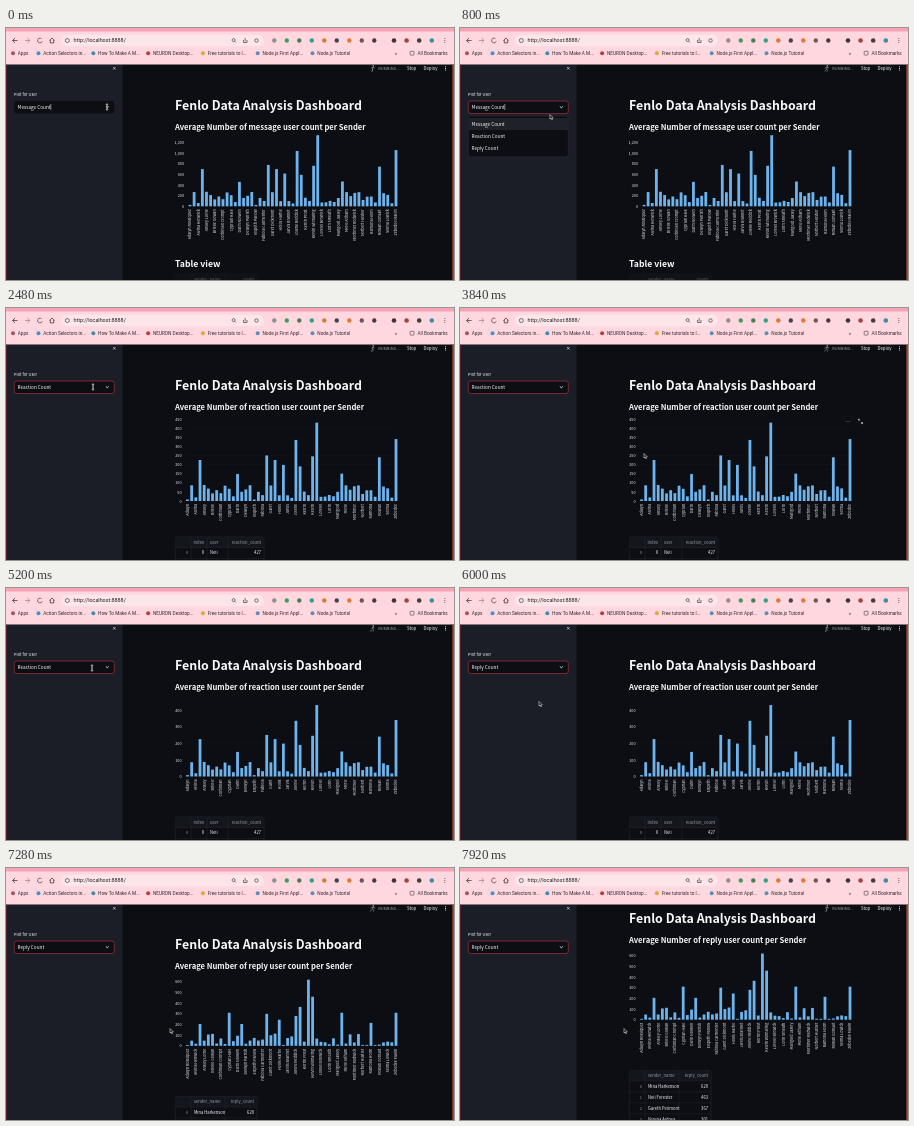
An HTML page with a canvas for the animation above (8000 ms loop, 448 px wide and 252 px high).

```html
<!DOCTYPE html>
<html lang="en">
<head>
<meta charset="utf-8">
<title>Dashboard</title>
<style>
html, body { margin: 0; width: 100%; height: 100%; overflow: hidden; background: #0c0e14; }
canvas { display: block; width: 448px; height: 252px; }
</style>
</head>
<body>
<canvas id="stage"></canvas>
<script>
const W = 448, H = 252, LOOP = 8000, BARS = 51;
const canvas = document.getElementById('stage');
const dpr = window.devicePixelRatio || 1;
canvas.width = W * dpr;
canvas.height = H * dpr;
const c = canvas.getContext('2d');

const SANS = '"Noto Sans CJK JP", "Noto Sans CJK SC", "Noto Sans", sans-serif';
const UI = 'Roboto, Inter, sans-serif';
const WHITE = '#fafafa', RED = '#b93a40', PANEL = '#1b1d27', PAGE = '#0c0e14', INK = '#4a3a40';

function random(seed) {
  return () => (seed = (seed * 16807) % 2147483647) / 2147483647;
}
// low, skewed noise with a few tall bars
function series(seed, spread, peaks) {
  const r = random(seed);
  return Array.from({ length: BARS }, (_, i) => {
    const noise = 8 + spread * r() ** 1.5;
    return peaks[i] || noise;
  });
}
const reaction = series(4242, 80, { 3: 225, 12: 148, 19: 250, 21: 225, 23: 198, 26: 335, 27: 190, 30: 245, 31: 430, 37: 150, 46: 240, 50: 340 });
const reply = series(977, 110, { 3: 205, 10: 310, 13: 205, 19: 300, 22: 245, 26: 280, 27: 365, 29: 620, 30: 460, 37: 310, 44: 215, 50: 310 });
const message = reaction.map(v => v * 3.1);

const people = ('Adalyn Rossiquez,Alvina Henwick,Ansley Lorne,Brielle Gowan,Corbinian Crompt,Cyprian Hale,' +
  'Darin Nolwen,Delwyn Parrish,Elspeth Parlow,Fabiola Carmenter,Garet Dickmont,Hollis Hartle,Jarvis Brannet,' +
  'Jolene Reddick,Kerrin Prost,Kelvin Wilmaring,Lorelei Browick,Lorin Smeath,Marigold Jaxley,Merle Altham,' +
  'Mortimer Rodwick,Norbert Hustler,Ramona Holm,Rowan Gonsalt,Selma Lowick,Zebedee Mallin').split(',');
const firstNames = people.map(p => p.split(' ')[0]);

const charts = {
  message: { data: message, base: 178.3, unit: 64 / 1200, step: 200, top: 1200, x0: 184, names: people },
  reaction: { data: reaction, base: 193, unit: 82 / 450, step: 50, top: 450, x0: 181.5, names: firstNames },
  compact: { data: reaction, base: 188.5, unit: 66.5 / 400, step: 100, top: 400, x0: 181.5, names: firstNames },
  reply: { data: reply, base: 178.3, unit: 64 / 600, step: 100, top: 600, x0: 181.5, names: people }
};
const options = ['Message Count', 'Reaction Count', 'Reply Count'];

// pointer moves: start, end, x, y
const moves = [
  [480, 1200, 77, 103], [1680, 2320, 87, 79], [2480, 3520, 185, 148],
  [4240, 5040, 86, 80], [5440, 5920, 80, 116], [6240, 6640, 142, 168], [6800, 7200, 165, 163]
];

const ease = p => p * p * (3 - 2 * p);
const span = (t, a, b) => ease(Math.min(1, Math.max(0, (t - a) / (b - a))));

function pointerAt(t) {
  let x = 101, y = 79;
  for (const [a, b, tx, ty] of moves) {
    const p = span(t, a, b);
    x += (tx - x) * p;
    y += (ty - y) * p;
  }
  return [x, y];
}

function text(s, x, y, size, color = WHITE, { weight = 400, align = 'left', font = SANS } = {}) {
  c.font = `${weight} ${size}px ${font}`;
  c.textAlign = align;
  c.fillStyle = color;
  c.fillText(s, x, y + size * 0.36);
}
function rect(x, y, w, h, color) {
  c.fillStyle = color;
  c.fillRect(x, y, w, h);
}
function round(x, y, w, h, r, fill, stroke, lw = 0.6) {
  c.beginPath();
  c.roundRect(x, y, w, h, r);
  if (fill) { c.fillStyle = fill; c.fill(); }
  if (stroke) { c.strokeStyle = stroke; c.lineWidth = lw; c.stroke(); }
}
function dot(x, y, r, color) {
  c.beginPath();
  c.arc(x, y, r, 0, 7);
  c.fillStyle = color;
  c.fill();
}
function ring(x, y, r, from = 0, to = 7) {
  c.beginPath();
  c.arc(x, y, r, from, to);
  c.strokeStyle = INK;
  c.lineWidth = 0.7;
  c.stroke();
}
// polylines given as flat coordinate lists
function line(color, lw, ...polys) {
  c.strokeStyle = color;
  c.lineWidth = lw;
  c.beginPath();
  for (const p of polys)
    for (let i = 0; i < p.length; i += 2) i ? c.lineTo(p[i], p[i + 1]) : c.moveTo(p[i], p[i + 1]);
  c.stroke();
}

function browser() {
  rect(0, 0, W, 36.5, '#ffd7de');
  rect(0, 0, W, 3.5, '#f7a3b4');
  const y = 12.5;
  line(INK, 0.8, [11.5, y, 6.5, y], [9, y - 2.4, 6.5, y, 9, y + 2.4]);
  line('#a58b92', 0.8, [19, y, 24, y], [21.5, y - 2.4, 24, y, 21.5, y + 2.4]);
  ring(34, y, 2.4, 0.3, 5.4);
  line(INK, 0.8, [43.4, y, 46, y - 2.5, 48.6, y], [44.3, y - 0.6, 44.3, y + 2.4, 47.7, y + 2.4, 47.7, y - 0.6]);
  round(55, 6.7, 203, 11.6, 5.8, '#fbe6ea');
  ring(61.3, y, 2);
  text('http://localhost:8888/', 67.5, y, 5.4, '#2a2024', { font: UI });
  ring(227.6, y - 0.4, 1.5);
  line(INK, 0.7, [228.8, y + 0.8, 230, y + 2], [237.5, y - 0.5, 237.5, y + 2, 241, y + 2, 241, y - 0.5], [239.2, y + 0.8, 239.2, y - 2.6]);
  ring(250.5, y, 1.7);
  ['#8d8f94', '#3f9f58', '#4f7a58', '#32a08c', '#d9792c', '#43444a', '#dd7a32', '#6e5a52', '#4a3a40']
    .forEach((col, i) => dot(268.3 + i * 12.5, y, 2.2, col));
  ['#3d3438', '#a1453c', '#4a3a40', '#3c8fa3'].forEach((col, i) => dot(388 + i * 12.6, y, 2.3, col));
  for (const dy of [-1.9, 0, 1.9]) dot(438.8, y + dy, 0.5, INK);

  const mark = (label, x, col) => {
    dot(x, 25.2, 2, col);
    text(label, x + 4.8, 25.2, 4.7, '#33282c', { font: UI });
  };
  mark('Apps', 7, '#a8555a');
  [['Action Selectors in...', '#4a8fd0'], ['How To Make A M...', '#3f8fb0'], ['NEURON Desktop...', '#c03a3a'],
    ['Free tutorials to l...', '#e0a92c'], ['Node.js First Appl...', '#5b8fb8'], ['Node.js Tutorial', '#5b8fb8']]
    .forEach(([label, col], i) => mark(label, 32.5 + i * 54.8, col));
  text('»', 388.5, 25, 5.5, INK, { font: UI });
  round(404.2, 23.3, 3.8, 3.8, 0.5, null, INK);
  text('All Bookmarks', 411.5, 25.2, 4.7, '#33282c', { font: UI });
}

function runner(t) {
  const s = Math.sin(t / 60) * 1.4, col = '#9a9ca3';
  dot(367.3, 37.9, 0.8, col);
  line(col, 0.6, [367, 38.8, 366.6, 41], [365 - s * 0.4, 40.2, 367, 39.3, 368.8 + s * 0.4, 40.1],
    [366.6, 41, 366.6 + s, 42.3, 366 + s, 43.7], [366.6, 41, 366.6 - s, 42.3, 365.6 - s, 43.5]);
}

function header(t) {
  runner(t);
  text('RUNNING...', 372.3, 40.4, 4, '#a3a5ac');
  text('Stop', 401, 40.4, 4.3);
  text('Deploy', 417.5, 40.4, 4.3);
  for (const dy of [-1.7, 0, 1.7]) dot(439.5, 40.4 + dy, 0.5, WHITE);
}

function select(value, focused) {
  text('Plot for User', 8, 67, 4);
  round(8.3, 73, 100, 12.6, 2.4, PAGE, focused && RED);
  text(value, 11.6, 79, 4.7);
  line(WHITE, 0.8, [99.8, 78.4, 101.3, 79.8, 102.8, 78.4]);
}

function menu(hot) {
  round(8.3, 88, 100, 41, 2.4, PAGE, '#31333f', 0.5);
  options.forEach((o, i) => {
    const y = 96 + i * 12;
    if (i === hot) rect(9, y - 6, 99, 12, '#1f2129');
    text(o, 11.6, y, 4.7);
  });
}

function chart({ data, base, unit, step, top, x0, names }) {
  const pitch = (390 - x0) / (BARS - 1);
  for (let v = 0; v <= top; v += step) {
    const y = base - v * unit;
    line('#141720', 0.4, [x0 - 2.5, y, 392.5, y]);
    text(v.toLocaleString('en-US'), x0 - 6, y + 0.3, 3.8, '#e6e8ee', { align: 'right' });
  }
  data.forEach((v, i) => {
    const x = x0 + i * pitch;
    rect(x - 1.4, base - v * unit, 2.8, v * unit, '#6db3ec');
    if (i % 2) return;
    c.save();
    c.translate(x, base + 3);
    c.rotate(-Math.PI / 2);
    text(names[i / 2], 0, 0, 3.7, '#e6e8ee', { align: 'right' });
    c.restore();
  });
}

// cols: title, left, right, right-aligned
function table(cols, rows, y, right) {
  const pitch = 11, h = rows.length * pitch + 10.5;
  round(169.3, y, right - 169.3, h, 2, PAGE, '#2a2d36', 0.5);
  rect(169.6, y + 0.3, right - 170, 10, '#14161d');
  const put = (s, [, l, r, end], cy, col) =>
    text(s, end ? r - 3 : l + 3, cy, 4.15, col, { align: end ? 'right' : 'left' });
  for (const col of cols) {
    put(col[0], col, y + 5.2, '#999ca4');
    line('#2a2d36', 0.4, [col[1], y, col[1], y + h]);
  }
  rows.forEach((row, i) => {
    const cy = y + 16 + i * pitch;
    line('#2a2d36', 0.4, [169.3, cy - 5.5, right, cy - 5.5]);
    text(i, 182, cy, 4, '#8d9098', { align: 'right' });
    row.forEach((s, k) => put(s, cols[k], cy, WHITE));
  });
}

const reactionTable = () => table(
  [['index', 185, 201, true], ['user', 201, 222], ['reaction_count', 222, 258, true]],
  [['0', 'Nell', '427'], ['1', 'Mina', '398']], 229, 258);
const replyTable = () => table(
  [['sender_name', 185, 219], ['reply_count', 219, 251, true]],
  [['Mina Harkenson', '620'], ['Nell Forester', '463'], ['Gareth Pellmont', '367'],
   ['Verena Aldous', '301'], ['Orla Winthorne', '298']], 229, 251);

function cursor(t) {
  const [x, y] = pointerAt(t);
  c.save();
  c.translate(x, y);
  if (x < 109 && y > 73 && y < 86) {
    const beam = [[-1.1, -3, 0, -2.3, 1.1, -3], [0, -2.3, 0, 2.3], [-1.1, 3, 0, 2.3, 1.1, 3]];
    line('#f4f4f4', 1.1, ...beam);
    line('#202020', 0.4, ...beam);
  } else {
    c.translate(-1, -2.5);
    c.scale(0.75, 0.75);
    c.beginPath();
    [[0, 0], [0, 6], [1.4, 4.8], [2.4, 7], [3.4, 6.5], [2.4, 4.4], [4.3, 4.3]].forEach(p => c.lineTo(...p));
    c.closePath();
    c.fillStyle = '#000';
    c.fill();
    c.strokeStyle = '#fff';
    c.lineWidth = 0.7;
    c.stroke();
  }
  c.restore();
}

function draw(t) {
  const stage = t < 2000 ? 'message' : t < 4480 ? 'reaction' : t < 6400 ? 'compact' : 'reply';
  const picked = t < 1280 ? 0 : t < 6000 ? 1 : 2;
  const word = t < 1360 ? 'message' : t < 6160 ? 'reaction' : 'reply';
  const open = (t >= 320 && t < 1280) || (t >= 5360 && t < 6000);

  c.setTransform(dpr, 0, 0, dpr, 0, 0);
  rect(0, 0, W, H, PAGE);

  c.save();
  c.beginPath();
  c.rect(116, 36.5, W - 116, H);
  c.clip();
  c.translate(0, -26.6 * span(t, 7240, 7760));
  text('Fenlo Data Analysis Dashboard', 169, 77.2, 12.4, WHITE, { weight: 700 });
  text(`Average Number of ${word} user count per Sender`, 169, 99, 7.65, WHITE, { weight: 700 });
  chart(charts[stage]);
  if (stage === 'message') {
    text('Table view', 169, 235.5, 8.7, WHITE, { weight: 700 });
    c.globalAlpha = 0.55;
    table([['sender_name', 185, 219], ['count', 219, 251, true]], [['', '']], 246, 251);
    c.globalAlpha = 1;
  } else if (stage === 'reply') replyTable();
  else reactionTable();
  c.restore();

  if (t >= 2960 && t < 4480) {
    for (const x of [386, 388, 390]) dot(x, 113.5, 0.4, '#a3a5ac');
    line('#c9ccd3', 0.7, [398.5, 112.5, 398.5, 111.2, 400, 111.2], [401, 115.6, 402.6, 115.6, 402.6, 114],
      [398.5, 111.2, 400, 112.7], [402.6, 115.6, 401, 114]);
  }

  header(t);
  rect(0, 36.5, 116.5, H, PANEL);
  line('#d5d6da', 0.7, [107, 39, 109.6, 41.6], [109.6, 39, 107, 41.6]);
  select(options[picked], t >= 160);
  if (t < 1280) line(WHITE, 0.5, [44.8, 76, 44.8, 82]);
  if (open) menu(Math.max(0, Math.min(2, Math.floor((pointerAt(t)[1] - 90) / 12))));
  browser();
  rect(0, 36.5, 0.6, H, '#7a2a2c');
  rect(446.4, 36.5, 1.6, H, '#b04a30');
  cursor(t);
}

const start = performance.now();
function tick(now) {
  draw(Math.max(0, now - start) % LOOP);
  requestAnimationFrame(tick);
}
draw(0);
requestAnimationFrame(tick);
</script>
</body>
</html>
```
